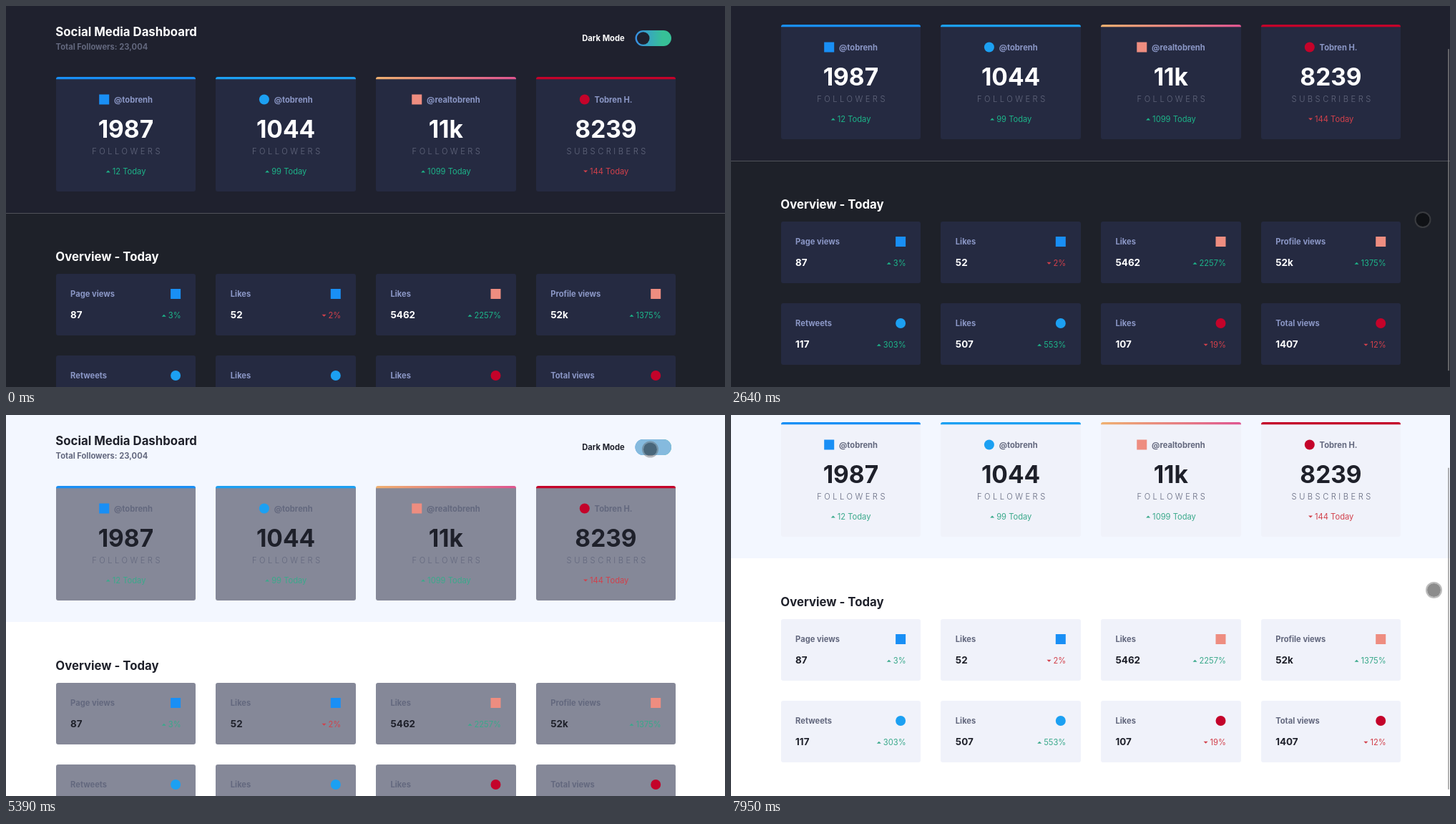
These frames come from a looping animation (1005x532 px, 8000 ms). An HTML page:

```html
<!DOCTYPE html>
<html lang="en">
<head>
<meta charset="utf-8">
<title>Social Media Dashboard</title>
<style>
  html, body { margin: 0; width: 100%; height: 100%; overflow: hidden; background: #1e2129; }
  svg {
    display: block; width: 1005px; height: 532px;
    font: 700 11.17px Inter, sans-serif; font-optical-sizing: none;
  }
  .page { fill: var(--page); }
  .top { fill: var(--top); }
  .line { fill: var(--line); }
  .card { fill: var(--card); }
  .strong { fill: var(--strong); }
  .label { fill: var(--label); }
  .muted { fill: #63687e; }
  .title { font-size: 16.75px; }
  .count { font-size: 33.5px; }
  .value { font-size: 13.4px; }
  .unit { font-weight: 340; letter-spacing: 3.5px; }
  .trend { font-weight: 400; }
  .middle { text-anchor: middle; }
  .end { text-anchor: end; }
  .up { fill: var(--up); }
  .down { fill: #d2404b; }
</style>
</head>
<body>
<svg id="stage" viewBox="0 0 1005 532">
  <defs>
    <linearGradient id="sunset"><stop stop-color="#efb070"/><stop offset="1" stop-color="#df5590"/></linearGradient>
    <linearGradient id="switch"><stop stop-color="#378fe6"/><stop offset=".75" stop-color="#37c097"/></linearGradient>
  </defs>
  <rect class="page" width="1005" height="532"/>
  <g id="content">
    <rect class="top" width="1005" height="289"/>
    <rect class="line" y="289" width="1005" height="1"/>
    <text class="strong title" x="69.3" y="42">Social Media Dashboard</text>
    <text class="muted" x="69.6" y="61">Total Followers: 23,004</text>
    <text class="strong" x="805.3" y="49">Dark Mode</text>
    <rect x="879.5" y="34" width="50.5" height="22" rx="11" fill="url(#switch)"/>
    <rect id="track" x="879.5" y="34" width="50.5" height="22" rx="11"/>
    <circle id="knob" cy="45" r="8.8"/>
    <text class="strong title" x="69.3" y="356">Overview - Today</text>
  </g>
  <rect id="scrollbar" x="1002" width="2" height="449" fill="#888"/>
  <g id="cursor">
    <circle r="9.5" fill="#000" fill-opacity=".45"/>
    <circle r="10.5" fill="none" stroke="#5f5f5f" stroke-opacity=".42" stroke-width="2"/>
  </g>
</svg>
<script>
const $ = id => document.getElementById(id);
const content = $('content');

function add(tag, attrs, text = '') {
  const el = document.createElementNS('http://www.w3.org/2000/svg', tag);
  for (const name in attrs) el.setAttribute(name, attrs[name]);
  el.textContent = text;
  return content.appendChild(el);
}
const write = (text, cls, x, y) => add('text', { class: cls, x, y }, text);

const networks = {
  blue: { bar: '#198ff5', icon: '#198ff5', round: false },
  sky: { bar: '#1ca0f2', icon: '#1ca0f2', round: true },
  sunset: { bar: 'url(#sunset)', icon: '#ee8d80', round: false },
  red: { bar: '#c4032a', icon: '#c4032a', round: true }
};

function icon(network, x, y) {
  const { icon: fill, round } = networks[network];
  add('rect', { x, y, width: 14, height: 14, rx: round ? 7 : 0, fill });
}

// A leading "-" marks a falling trend.
function trend(change, anchor, x, y) {
  const falling = change[0] === '-';
  const direction = falling ? 'down' : 'up';
  const text = write(change.replace('-', ''), `trend ${direction} ${anchor}`, x, y);
  const arrowX = text.getBBox().x - 6;
  const shape = falling ? 'l-3 -3h6z' : 'l3 3h-6z';
  add('path', { class: direction, d: `M${arrowX} ${y - (falling ? 2.5 : 5.5)}${shape}` });
}

// Card edges snap to whole pixels; their contents do not.
function column(i) {
  const x = 69.6 + i * 223.7, right = x + 195.6;
  const left = Math.round(x);
  return { x, center: (x + right) / 2, left, width: Math.round(right) - left };
}

[
  ['blue', '@tobrenh', '1987', 'FOLLOWERS', '12 Today'],
  ['sky', '@tobrenh', '1044', 'FOLLOWERS', '99 Today'],
  ['sunset', '@realtobrenh', '11k', 'FOLLOWERS', '1099 Today'],
  ['red', 'Tobren H.', '8239', 'SUBSCRIBERS', '-144 Today']
].forEach(([network, name, count, unit, change], i) => {
  const { center, left, width } = column(i);
  add('rect', { x: left, y: 99, width, height: 8, rx: 3, fill: networks[network].bar });
  add('path', { class: 'card', d: `M${left} 102.3h${width}v153.7a3 3 0 0 1 -3 3h${6 - width}a3 3 0 0 1 -3 -3z` });
  const title = write(name, 'label middle', center + 10.6, 135);
  icon(network, title.getBBox().x - 20.8, 123.5);
  write(count, 'strong count middle', center, 184.3);
  write(unit, 'muted unit middle', center + 2.2, 207);
  trend(change, 'middle', center + 4.7, 235);
});

[
  ['blue', 'Page views', '87', '3%'],
  ['blue', 'Likes', '52', '-2%'],
  ['sunset', 'Likes', '5462', '2257%'],
  ['sunset', 'Profile views', '52k', '1375%'],
  ['sky', 'Retweets', '117', '303%'],
  ['sky', 'Likes', '507', '553%'],
  ['red', 'Likes', '107', '-19%'],
  ['red', 'Total views', '1407', '-12%']
].forEach(([network, label, value, change], i) => {
  const { x, left, width } = column(i % 4), y = i < 4 ? 374 : 488;
  add('rect', { class: 'card', x: left, y, width, height: 86, rx: 3 });
  write(label, 'label', x + 20.5, y + 32);
  icon(network, x + 160.5, y + 21);
  write(value, 'strong value', x + 20.5, y + 62);
  trend(change, 'end', x + 175, y + 62.3);
});

const LOOP = 8000, THEME_START = 5268, THEME_LENGTH = 450;
const WHEEL_LENGTH = 280, TICK = 70, REST = 22;

// Each wheel turn: [start, distance]
const wheel = [[2030, TICK], [2570, REST], [3820, -TICK], [4130, -REST], [7130, TICK], [7740, REST]];

// Each pointer move: [start, length, dx, dy]
const moves = [
  [530, 620, -41, -353], [1150, 210, -6, 25], [1360, 210, 23.5, 109],
  [4440, 540, -66.5, -250.5], [5600, 410, 82, 196.5]
];

const clamp = p => Math.min(1, Math.max(0, p));
const lerp = (a, b, p) => a + (b - a) * p;
const mix = (a, b, p) => `color-mix(in srgb, ${b} ${p * 100}%, ${a})`;
const easeInOut = p => p < .5 ? 2 * p * p : 1 - 2 * (1 - p) ** 2;
const eased = (t, start, length) => easeInOut(clamp((t - start) / length));

function drawScroll(t) {
  const scroll = wheel.reduce((sum, [start, d]) => sum + d * eased(t, start, WHEEL_LENGTH), 0);
  content.setAttribute('transform', `translate(0 ${-Math.round(scroll)})`);

  // The scrollbar fades once the wheel has rested.
  const last = wheel.findLast(([start]) => start < t);
  const idle = last ? t - last[0] - WHEEL_LENGTH : Infinity;
  $('scrollbar').setAttribute('y', scroll * .826);
  $('scrollbar').setAttribute('opacity', .65 * clamp((580 - idle) / 280));
}

// The page flips at once; cards and switch ease over.
function drawTheme(t) {
  const light = t >= THEME_START;
  const p = 1 - (1 - clamp((t - THEME_START) / THEME_LENGTH)) ** 2;
  const colors = {
    page: light ? '#fff' : '#1e2129',
    top: light ? '#f3f7ff' : '#1f212e',
    line: light ? '#fff' : '#505259',
    strong: light ? '#1e202a' : '#fff',
    label: light ? '#63687e' : '#8b97c6',
    up: light ? '#3aa98b' : '#1db489',
    card: mix('#252a41', '#f0f2fa', p)
  };
  for (const name in colors) $('stage').style.setProperty('--' + name, colors[name]);
  $('track').style.fill = mix('#4db0e1', '#c4c6da', p);
  $('track').setAttribute('opacity', light ? 1 : 0);
  $('knob').style.fill = light ? mix('#1a7fc2', '#fff', p) : '#1f212e';
  $('knob').setAttribute('cx', lerp(890.7, 918, p));
}

function drawCursor(t) {
  let x = 990.5, y = 517.5;
  for (const [start, length, dx, dy] of moves) {
    const p = eased(t, start, length);
    x += dx * p;
    y += dy * p;
  }
  $('cursor').setAttribute('visibility', t < moves[0][0] ? 'hidden' : 'visible');
  $('cursor').setAttribute('transform', `translate(${x} ${y})`);
}

function frame() {
  const t = performance.now() % LOOP;
  drawScroll(t);
  drawTheme(t);
  drawCursor(t);
  requestAnimationFrame(frame);
}
frame();
</script>
</body>
</html>
```
